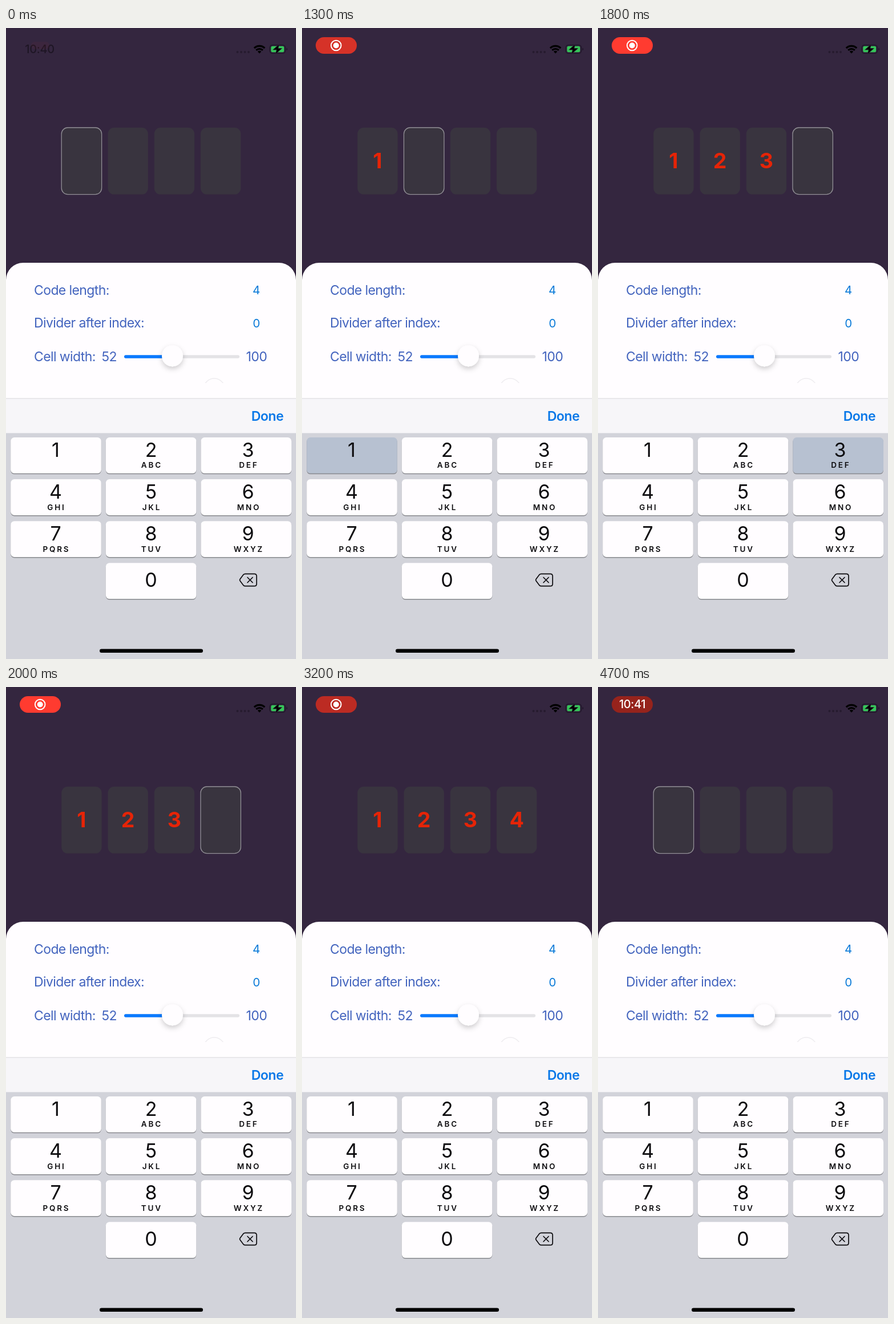
Recreate the animation shown at these times as an HTML page. Size 508 by 1102 pixels, loop 4800 ms.

```html
<!DOCTYPE html>
<html lang="en">
<head>
<meta charset="utf-8">
<title>Code input demo</title>
<style>
  html, body { margin: 0; width: 100%; height: 100%; overflow: hidden; background: #34263f; }
  svg { display: block; width: 100%; height: 100%; font-family: Inter, "Open Sans", sans-serif; }
  .label { font-size: 23px; letter-spacing: -.6px; fill: #4364be; }
  .value { font-size: 20.5px; fill: #0a7ad8; text-anchor: middle; }
  .done { font-size: 23px; font-weight: 600; letter-spacing: -.5px; fill: #0878e8; text-anchor: end; }
  .clock { font-size: 20px; font-weight: 500; letter-spacing: -.4px; text-anchor: middle; }
  .digit { font-size: 37.5px; font-weight: 700; fill: #e62407; text-anchor: middle; }
  .num { font-size: 34px; text-anchor: middle; fill: #0b0a0d; }
  .abc { font-size: 13.5px; font-weight: 600; letter-spacing: 2.8px; text-anchor: middle; fill: #0b0a0d; }
  .cell { fill: #39343f; stroke-width: 1.3; }
</style>
</head>
<body>
<svg viewBox="0 0 508 1102" preserveAspectRatio="none">
  <defs>
    <filter id="soft" x="-50%" y="-50%" width="200%" height="200%">
      <feDropShadow dx="0" dy="4" stdDeviation="5" flood-opacity=".2"/>
    </filter>
    <clipPath id="list"><rect y="410" width="508" height="210"/></clipPath>
  </defs>
  <rect width="508" height="1102" fill="#34263f"/>

  <text id="plainClock" class="clock" x="59" y="44">10:40</text>
  <g id="pill">
    <rect id="pillShape" x="24" y="16" width="72" height="29" rx="14.5"/>
    <g id="record">
      <circle cx="59.7" cy="30.5" r="8.8" fill="none" stroke="#fff" stroke-width="2"/>
      <circle cx="59.7" cy="30.5" r="5" fill="#fff"/>
    </g>
    <text id="pillClock" class="clock" x="60" y="37.3" fill="#fff"></text>
  </g>

  <g fill="#261b2f">
    <circle cx="405.5" cy="42" r="2"/><circle cx="412" cy="42" r="2"/>
    <circle cx="418.5" cy="42" r="2"/><circle cx="425" cy="42" r="2"/>
  </g>
  <g fill="none" stroke="#000" stroke-width="3.2">
    <path d="M434.8 35.2a13 13 0 0 1 18.4 0"/>
    <path d="M438.2 38.9a8.2 8.2 0 0 1 11.6 0"/>
    <path d="M440.8 41.2a4.5 4.5 0 0 1 6.4 0L444 44.6z" fill="#000" stroke="none"/>
  </g>
  <rect x="462.2" y="29.7" width="27" height="14.6" rx="4.4" fill="none" stroke="#20172a" stroke-width="1.5"/>
  <path d="M491 34.7q2 .5 2 2.3t-2 2.3z" fill="#20172a"/>
  <rect x="464.3" y="31.8" width="22.8" height="10.4" rx="2.6" fill="#35c759"/>
  <path d="M478.5 28.5l-11 9.6h6.6l-2 7.4 11.4-10h-6.7z" fill="#000" stroke="#34263f" stroke-width=".8"/>

  <g id="cells"></g>

  <path d="M0 660V440a30 30 0 0 1 30-30H478a30 30 0 0 1 30 30V660z" fill="#fffdff"/>
  <text class="label" x="49" y="466">Code length:</text>
  <text class="label" x="49" y="523">Divider after index:</text>
  <text class="label" x="49" y="581.5">Cell width:</text>
  <text class="label" x="167.5" y="581.5">52</text>
  <text class="label" x="420.5" y="581.5">100</text>
  <text class="value" x="438.7" y="465">4</text>
  <text class="value" x="438.7" y="522.5">0</text>
  <rect x="207" y="571.3" width="202" height="5.5" rx="2.7" fill="#e4e3e6"/>
  <rect x="207" y="571.3" width="85" height="5.5" rx="2.7" fill="#0a7aff"/>
  <circle cx="291.5" cy="572.7" r="18.5" fill="#fffdff" filter="url(#soft)"/>
  <g clip-path="url(#list)">
    <circle cx="364.7" cy="630.5" r="18.5" fill="#fffdff" stroke="#eeecef" stroke-width="1.5"/>
  </g>

  <rect y="647" width="508" height="61" fill="#f7f6f9"/>
  <rect y="646.5" width="508" height="1" fill="#d8d7da"/>
  <text class="done" x="486" y="686">Done</text>
  <rect y="707.5" width="508" height="394.5" fill="#d2d3da"/>
  <g id="keys"></g>
  <g id="erase" stroke="#0b0a0d" stroke-width="1.7" stroke-linejoin="round" stroke-linecap="round">
    <path id="eraseBody" d="M419 953.3H435q4 0 4 4v13.4q0 4-4 4H419q-1.8 0-3-1.3l-6-7.9q-1.1-1.5 0-3l6-7.9q1.2-1.3 3-1.3z"/>
    <path id="eraseCross" d="M423 959.5l9 9m0-9l-9 9"/>
  </g>
  <rect x="164" y="1084.5" width="181" height="6.6" rx="3.3" fill="#000"/>
</svg>
<script>
const LOOP = 4800, STEP = 100;
const presses = [[1300, 1500], [1600, 1700], [1800, 2000], [2100, 2300]];
const erases = [3800, 4100, 4300, 4500];
const $ = id => document.getElementById(id);
const clamp = v => Math.max(0, Math.min(1, v));

function add(parent, tag, attrs, text = '') {
  const el = document.createElementNS('http://www.w3.org/2000/svg', tag);
  for (const name in attrs) el.setAttribute(name, attrs[name]);
  el.textContent = text;
  return parent.appendChild(el);
}

const cells = [0, 1, 2, 3].map(i => {
  const x = 97.2 + 81.25 * i;
  return {
    box: add($('cells'), 'rect', { class: 'cell', x, y: 174, width: 70.4, height: 116.6, rx: 11 }),
    digit: add($('cells'), 'text', { class: 'digit', x: x + 35.2, y: 245.3 }, i + 1)
  };
});

const letters = ['', 'ABC', 'DEF', 'GHI', 'JKL', 'MNO', 'PQRS', 'TUV', 'WXYZ'];
const centers = [87, 254, 424];

function addKey(col, row, number, abc) {
  const box = { x: 8.2 + 166.6 * col, y: 715 + 73.1 * row, width: 158.6, height: 62.8, rx: 6.5 };
  add($('keys'), 'rect', { ...box, y: box.y + 1.5, fill: '#88898e' });
  const face = add($('keys'), 'rect', { ...box, fill: '#fffdff' });
  const baseline = box.y + (number ? 34 : 42);
  add($('keys'), 'text', { class: 'num', x: centers[col], y: baseline }, number);
  add($('keys'), 'text', { class: 'abc', x: centers[col] + 1.4, y: box.y + 53.4 }, abc);
  return face;
}

const faces = letters.map((abc, i) => addKey(i % 3, Math.floor(i / 3), i + 1, abc));
addKey(1, 3, 0, '');

// Recording badge: stays bright, then dips briefly towards black.
function badgeLight(t) {
  const dip = (1 + Math.cos((t - 950) / 1970 * 2 * Math.PI)) / 2;
  return 1 - .6 * dip ** 4;
}

function draw(t) {
  const grow = 1 - (1 - clamp(t / 400)) ** 3;
  const scale = .45 + .55 * grow;
  const light = badgeLight(t);
  $('plainClock').setAttribute('opacity', .42 * (1 - clamp(t / 200)));
  $('pill').setAttribute('opacity', .04 + .96 * grow);
  $('pill').setAttribute('transform', `translate(60 30.5) scale(${scale}) translate(-60 -30.5)`);
  $('pillShape').setAttribute('fill', `rgb(${[255, 59, 48].map(c => Math.round(c * light))})`);

  const swap = clamp((t - 3200) / 300);
  $('record').setAttribute('opacity', t < 100 ? 0 : 1 - swap);
  $('pillClock').setAttribute('opacity', swap);
  $('pillClock').textContent = t < 4300 ? '10:40' : '10:41';

  const typed = presses.filter(([down]) => t >= down).length;
  const filled = typed - erases.filter(down => t >= down).length;
  cells.forEach(({ box, digit }, i) => {
    box.setAttribute('stroke', i === filled ? '#929096' : 'none');
    digit.setAttribute('visibility', i < filled ? 'visible' : 'hidden');
  });
  presses.forEach(([down, up], i) =>
    faces[i].setAttribute('fill', t >= down && t < up ? '#b7c1d1' : '#fffdff'));

  const erasing = erases.some(down => t >= down && t < down + 100);
  $('eraseBody').setAttribute('fill', erasing ? '#0b0a0d' : 'none');
  $('eraseCross').setAttribute('stroke', erasing ? '#d2d3da' : '#0b0a0d');
}

const start = performance.now();
function tick() {
  const t = (performance.now() - start) % LOOP;
  draw(Math.floor(t / STEP) * STEP);
  requestAnimationFrame(tick);
}
tick();
</script>
</body>
</html>
```
